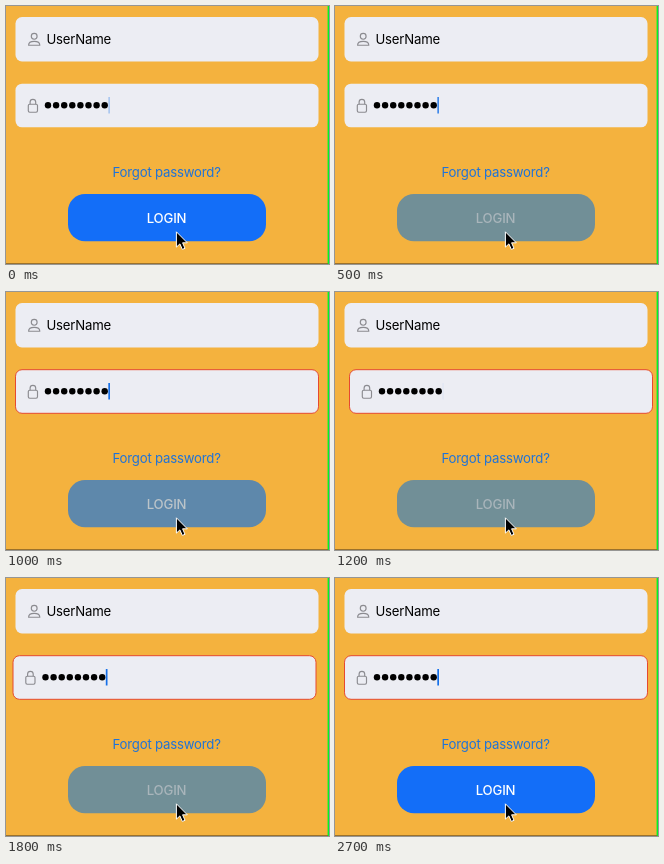
Write an HTML page that moves like this. It is 323 px wide and 258 px high and loops after 2.8 s.

```html
<!DOCTYPE html>
<html lang="en">
<head>
<meta charset="utf-8">
<title>Login shake</title>
<style>
  html, body { margin: 0; width: 100%; height: 100%; overflow: hidden; background: #f4b23e; }
  svg { display: block; }
  text { font: 13.2px Inter, Roboto, sans-serif; letter-spacing: -.2px; }
  #label { font-weight: 500; }
  .field { fill: #ecedf3; }
  .icon { fill: none; stroke: #8b8b90; stroke-width: 1.15; }
</style>
</head>
<body>
<svg width="323" height="258" viewBox="0 0 323 258">
  <rect width="323" height="258" fill="#f4b23e"/>

  <rect class="field" x="9.5" y="11" width="303" height="44.5" rx="6.5"/>
  <g class="icon">
    <circle cx="28.2" cy="30.3" r="2.9"/>
    <path d="M22.6 39.2C22.6 36.6 25 35.3 28.2 35.3S33.8 36.6 33.8 39.2Z" stroke-linejoin="round"/>
  </g>
  <text x="40.4" y="38">UserName</text>

  <g id="password">
    <rect class="field" id="box" x="9.5" y="77.7" width="303" height="43.6" rx="6.5"/>
    <g class="icon">
      <rect x="22.3" y="98.2" width="9.2" height="8" rx="1.4"/>
      <path d="M24.1 98.2V96.1a2.8 2.8 0 0 1 5.6 0V98.2"/>
    </g>
    <g id="dots"></g>
    <rect id="caret" x="102.3" y="91" width="1.7" height="16.5" fill="#1670e8"/>
  </g>

  <text x="106.5" y="171" fill="#1f73d8">Forgot password?</text>

  <rect id="button" x="62" y="188" width="198" height="47.3" rx="17"/>
  <text id="label" x="140.7" y="216.5">LOGIN</text>

  <path d="M170.4 225.8v15.3l3.5-3.2 2.4 5.5 2.7-1.1-2.4-5.5h4.7Z" stroke="#fff"/>
  <rect x="321.6" width="1.4" height="258" fill="#00f52a"/>
  <path d="M0 257.6H322" stroke="#7a5a25" stroke-width=".8"/>
</svg>
<script>
const LOOP = 2800, STEP = 100;
const CLICKS = [
  { down: 250, up: 520, shake: 532 },
  { down: 865, up: 1210, shake: 1120 },
  { down: 1510, up: 1840, shake: 1780 },
];
const FADE = 170;
const SHAKE_TIME = 325, SWING = 160, REACH = 5;
const BLINK = 1000;

const el = id => document.getElementById(id);
const clamp = v => Math.min(1, Math.max(0, v));
const blend = (a, b, k) => `rgb(${a.map((v, i) => Math.round(v + (b[i] - v) * k))})`;

const ramp = (t, start) => clamp((t - start) / FADE);
const pressed = t => CLICKS.reduce((sum, c) => sum + ramp(t, c.down) - ramp(t, c.up), 0);

// Triangle wave between -REACH and REACH
function shake(t) {
  const click = CLICKS.find(c => t >= c.shake && t < c.shake + SHAKE_TIME);
  if (!click) return 0;
  const phase = (t - click.shake) % SWING / SWING;
  return REACH * (1 - 4 * Math.abs(phase - .5));
}

// The first failed login restarts the blinking
function caret(t) {
  const peak = t < CLICKS[0].shake ? 300 : 840;
  return clamp(.55 + .8 * Math.cos(2 * Math.PI * (t - peak) / BLINK));
}

for (let i = 0; i < 8; i++)
  el("dots").innerHTML += `<circle cx="${42 + i * 8.1}" cy="99.3" r="3.2"/>`;

function draw(now) {
  const t = Math.floor(now % LOOP / STEP) * STEP;
  const press = pressed(t);
  el("password").setAttribute("transform", `translate(${shake(t)})`);
  el("box").setAttribute("stroke", t >= CLICKS[0].shake ? "#e6492f" : "none");
  el("caret").setAttribute("opacity", caret(t));
  el("button").setAttribute("fill", blend([19, 110, 248], [113, 143, 151], press));
  el("label").setAttribute("fill", blend([255, 255, 255], [169, 181, 187], press));
}

let begin;
function tick(now) {
  begin ??= now;
  draw(now - begin);
  requestAnimationFrame(tick);
}
draw(0);
requestAnimationFrame(tick);
</script>
</body>
</html>
```
